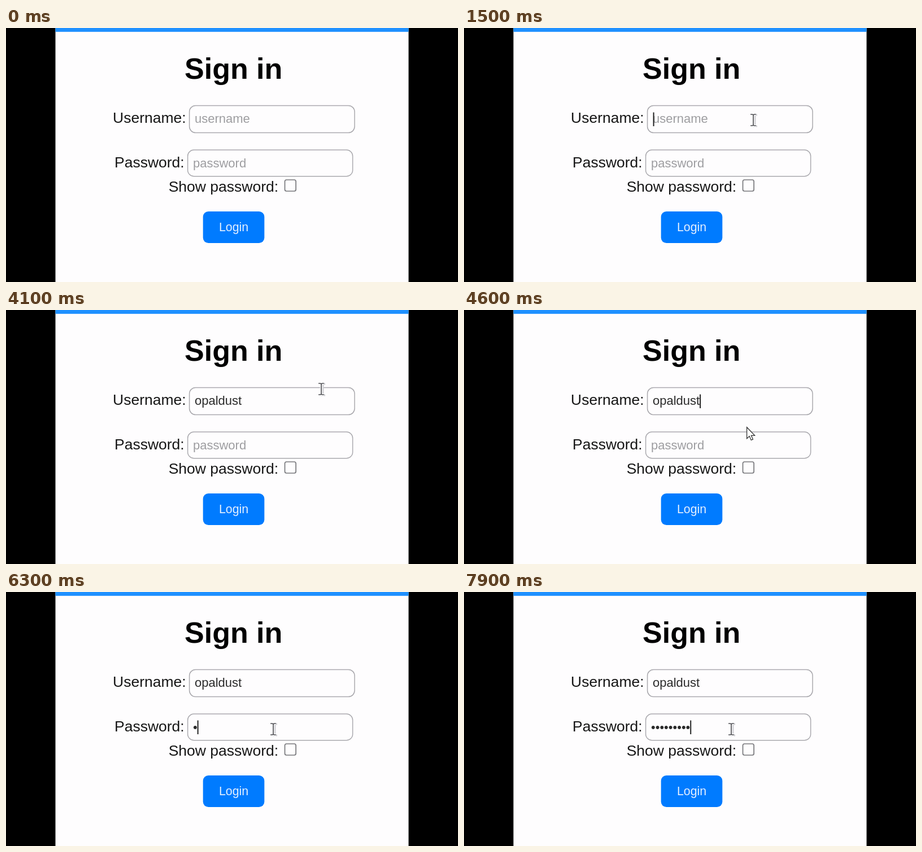
An HTML page that plays this animation: 800 by 450 pixels, repeating every 8 s.

```html
<!DOCTYPE html>
<html lang="en">
<head>
<meta charset="utf-8">
<title>Sign in</title>
<style>
  html, body { margin: 0; width: 100%; height: 100%; overflow: hidden; background: #000; }
  svg { display: block; width: 100vw; height: 100vh; }
  text { font-family: "Liberation Sans", Arial, sans-serif; fill: #161616; }
  .label { font-size: 26.5px; }
  .value { font-size: 22px; }
  .field { fill: #fefdfe; stroke: #aaa9ae; stroke-width: 1.5; }
  .caret { stroke: #222; stroke-width: 2; }
</style>
</head>
<body>
<svg viewBox="0 0 800 450">
  <rect width="800" height="450" fill="#000"/>
  <rect x="87.5" width="625" height="450" fill="#fefdfe"/>
  <rect x="87.5" width="625" height="6.8" fill="#1e90ff"/>

  <text x="316" y="90" font-size="52" font-weight="bold" style="fill:#000">Sign in</text>
  <text class="label" x="189" y="168">Username:</text>
  <text class="label" x="192" y="247">Password:</text>
  <text class="label" x="287.7" y="289.5">Show password:</text>

  <rect class="field" x="324.6" y="137.4" width="292.4" height="48.2" rx="11"/>
  <rect class="field" x="321.6" y="216" width="292" height="46.8" rx="11"/>
  <rect x="493.5" y="269" width="19.6" height="20" rx="3" fill="#fefdfe" stroke="#77777b" stroke-width="1.7"/>

  <rect x="348.7" y="325" width="108.6" height="56" rx="9.5" fill="#007bff"/>
  <text x="403" y="360" font-size="21.3" text-anchor="middle" style="fill:#e4f0ff">Login</text>

  <text id="user" class="value" x="334" y="168"></text>
  <text id="pass" class="value" x="331" y="247"></text>
  <path id="userCaret" class="caret" d="M0 149.5V174"/>
  <path id="passCaret" class="caret" d="M0 227.5V252"/>

  <g id="beam" fill="none">
    <path d="M-1 -9H7M3 -9V11M-1 11H7" stroke="#d3d3d7" stroke-width="3"/>
    <path d="M-5 -10H5M0 -10V10M-5 10H5" stroke="#fff" stroke-width="4"/>
    <path d="M-5 -10H-1.5L0 -9L1.5 -10H5M0 -9V9M-5 10H-1.5L0 9L1.5 10H5" stroke="#505055" stroke-width="1.7"/>
  </g>
  <path id="arrow" d="M0 0V20L4.6 15.8L7.6 22.8L10.8 21.4L7.8 14.6H14Z" fill="#fff" stroke="#333" stroke-width="1.3"/>
</svg>
<script>
const LOOP = 8000, STEP = 100;
const $ = id => document.getElementById(id);

const userField = {
  text: $("user"), caret: $("userCaret"), left: 334, hint: "username",
  typed: "opaldust",
  keys: [2200, 2300, 2500, 2600, 3000, 3200, 3300, 3500],
  caretOn: [[1000, 1700], [2200, 4100], [4600, 5000]]
};
const passField = {
  text: $("pass"), caret: $("passCaret"), left: 331, hint: "password",
  typed: "•".repeat(9),
  keys: [6200, 6700, 6800, 6900, 7000, 7300, 7600, 7800, 7900],
  caretOn: [[5000, 5600], [6100, LOOP]]
};

// Pointer stops: time, x, y
const route = [
  [700, 652, 262], [1100, 512, 163], [1500, 512, 163], [1700, 558, 140],
  [4100, 558, 140], [4900, 474, 239], [5000, 473, 243], [LOOP, 473, 243]
];

const within = (t, spans) => spans.some(([a, b]) => t >= a && t < b);
const show = (el, on) => el.setAttribute("visibility", on ? "visible" : "hidden");
const ease = p => p * p * (3 - 2 * p);

function pointerAt(t) {
  const i = route.findIndex(stop => stop[0] > t);
  const [t0, x0, y0] = route[i - 1], [t1, x1, y1] = route[i];
  const p = ease((t - t0) / (t1 - t0));
  return [x0 + (x1 - x0) * p, y0 + (y1 - y0) * p];
}

function drawField(f, t) {
  const count = f.keys.filter(k => k <= t).length;
  f.text.textContent = count ? f.typed.slice(0, count) : f.hint;
  f.text.style.fill = count ? "#2a2a2a" : "#9d9da0";
  const width = count ? f.text.getComputedTextLength() : 0.7;
  f.caret.setAttribute("transform", `translate(${f.left + width + 0.9})`);
  f.caret.style.stroke = f === userField && t >= 2700 && t < 2900 ? "#888" : "#222";
  show(f.caret, within(t, f.caretOn));
}

function drawPointer(t) {
  const visible = t >= route[0][0];
  const [x, y] = visible ? pointerAt(t) : [0, 0];
  const overField = y < 186 || (y > 216 && y < 263 && x < 614 && t > 4000);
  for (const [el, on] of [[$("beam"), overField], [$("arrow"), !overField]]) {
    el.setAttribute("transform", `translate(${x} ${y})`);
    show(el, visible && on);
  }
}

function render(now) {
  const t = Math.floor((now % LOOP) / STEP) * STEP;
  drawField(userField, t);
  drawField(passField, t);
  drawPointer(t);
}

const start = performance.now();
function tick() {
  render(performance.now() - start);
  requestAnimationFrame(tick);
}
tick();
</script>
</body>
</html>
```
